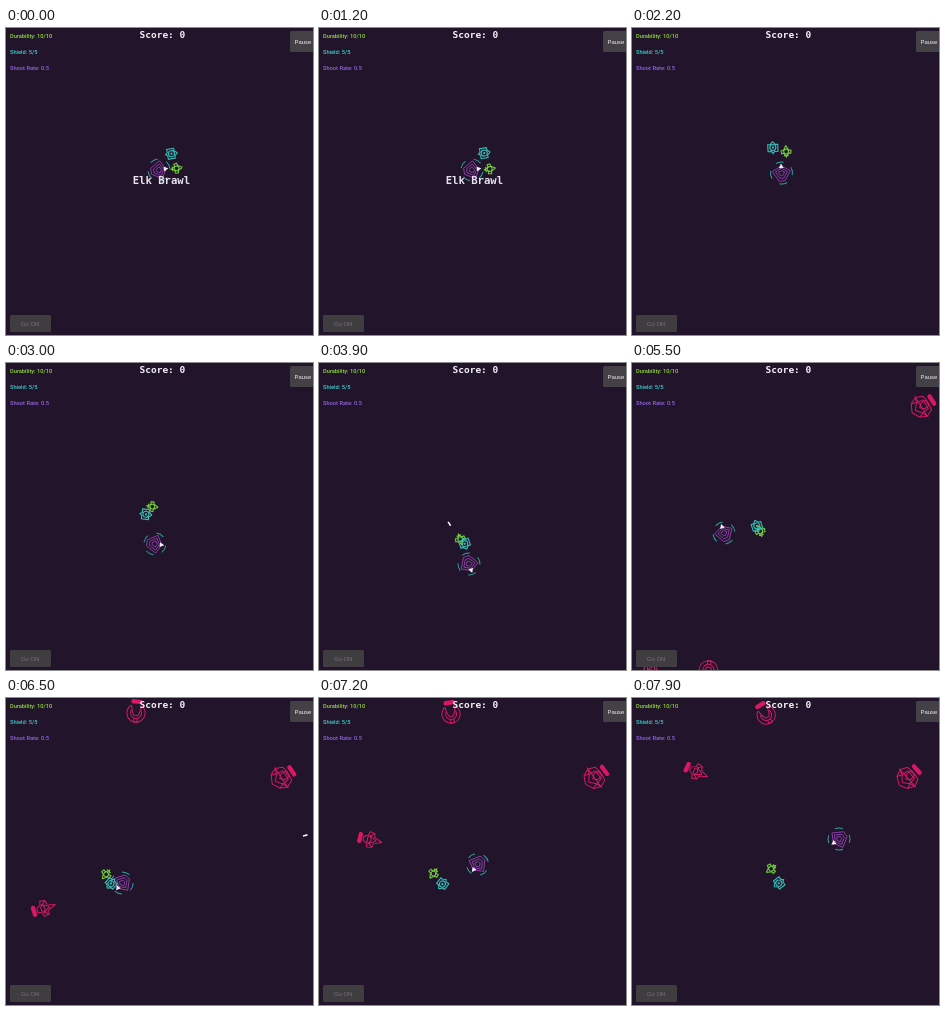
Animation, 307 px wide and 307 px high, one loop 8 s. Source, as an HTML page with a canvas:

```html
<!DOCTYPE html>
<html lang="en">
<head>
<meta charset="utf-8">
<title>Arcade shooter</title>
<style>
html, body { margin: 0; width: 100%; height: 100%; overflow: hidden; background: #21142b; }
canvas { display: block; width: 100vw; height: 100vh; }
</style>
</head>
<body>
<canvas id="stage"></canvas>
<script>
const SIZE = 307, LOOP = 8, TITLE_END = 2;
const BG = '#21142b', RED = '#d81862', CYAN = '#35c0b8', GREEN = '#72cc38',
      PURPLE = '#9343b0', WHITE = '#f4f2f6';
const canvas = document.getElementById('stage');
const ctx = canvas.getContext('2d');

// Steered motion: [seconds, x, y, degrees]
const shipKeys = [
  [1.7, 153, 142, -10], [2.2, 149.5, 145, -93], [3.5, 149, 202, 75], [3.9, 150, 201, 70],
  [4.8, 129, 173, -30], [5.5, 92, 170, -108], [6.5, 116, 185, -230], [7.9, 207, 141, -217]
];
// Midpoint of the two drones and the direction from green to cyan
const pairKeys = [
  [1.5, 168, 133, 251], [2.2, 147.5, 121.5, 197], [3.9, 143.5, 178.5, 45],
  [4.8, 150.5, 178, -79], [5.5, 126.5, 165.5, -121], [6.5, 102.5, 181, -297], [7.9, 143, 178, -298]
];
// Straight flights: at (x, y) at time t, speed per second, active from start to stop
const enemies = [
  { draw: ring, t: 4.8, x: 6, y: 34, vx: 60, vy: -75, start: 4.2, stop: 5.5 },
  { draw: ring, t: 3.9, x: -10, y: 238, vx: 54, vy: 43, start: 3.6, stop: 6 },
  { draw: ring, t: 6.5, x: 130, y: 15, vx: 3, vy: 1.4, start: 6, stop: 8 },
  { draw: heavy, t: 4.8, x: 300, y: 18, vx: -14, vy: 36, start: 4, stop: 6.5 },
  { draw: dart, t: 6.5, x: 39, y: 210, vx: 19, vy: -97, start: 5.2, stop: 8 }
];
const shots = [
  { t: 3.9, x: 130.5, y: 161, vx: -120, vy: -180, start: 3.8, stop: 8 },
  { t: 4.8, x: 96, y: 184.5, vx: -210, vy: 45, start: 4.53, stop: 8 },
  { t: 6.5, x: 299, y: 137.5, vx: 210, vy: -54, start: 5.62, stop: 8 }
];

const rad = deg => deg * Math.PI / 180;

// Cubic Hermite interpolation through unevenly timed keys
function at(keys, t) {
  const last = keys.length - 1;
  if (t <= keys[0][0]) return keys[0].slice(1);
  if (t >= keys[last][0]) return keys[last].slice(1);
  let i = 0;
  while (keys[i + 1][0] < t) i++;
  const a = keys[i], b = keys[i + 1];
  const before = keys[Math.max(0, i - 1)], after = keys[Math.min(last, i + 2)];
  const span = b[0] - a[0], u = (t - a[0]) / span, u2 = u * u, u3 = u2 * u;
  return a.slice(1).map((v, n) => {
    const k = n + 1;
    const m0 = (b[k] - before[k]) / (b[0] - before[0]) * span;
    const m1 = (after[k] - a[k]) / (after[0] - a[0]) * span;
    return (2 * u3 - 3 * u2 + 1) * v + (u3 - 2 * u2 + u) * m0
         + (3 * u2 - 2 * u3) * b[k] + (u3 - u2) * m1;
  });
}

function fly(f, t) {
  const dt = Math.min(t, f.stop) - f.t;
  return [f.x + f.vx * dt, f.y + f.vy * dt];
}

function place(x, y, angle, draw) {
  ctx.save();
  ctx.translate(x, y);
  ctx.rotate(angle);
  draw();
  ctx.restore();
}

function pen(color, width) {
  ctx.strokeStyle = ctx.fillStyle = color;
  ctx.lineWidth = width;
}

function arc(r, from, to) {
  ctx.beginPath();
  ctx.arc(0, 0, r, rad(from), rad(to));
  ctx.stroke();
}

// Outline given by its upper half, mirrored across the x axis
function mirror(half, scale = 1) {
  const n = half.length;
  ctx.beginPath();
  for (let i = 0; i < n; i += 2) ctx.lineTo(half[i] * scale, half[i + 1] * scale);
  for (let i = n - 2; i >= 0; i -= 2) ctx.lineTo(half[i] * scale, -half[i + 1] * scale);
  ctx.stroke();
}

function ship() {
  pen(PURPLE, 0.85);
  for (const s of [1, 0.66, 0.34]) mirror([7, 0, 2, -9, -8, -3, -8, 0], s);
  ctx.fillStyle = WHITE;
  ctx.beginPath();
  ctx.moveTo(9.5, 0);
  ctx.lineTo(5, -2.4);
  ctx.lineTo(5, 2.4);
  ctx.fill();
}

function shield() {
  pen('#2f9f9f', 1);
  for (let a = 0; a < 360; a += 90) arc(11, a - 21, a + 21);
}

function cyanDrone() {
  pen(CYAN, 1.1);
  arc(3, 0, 360);
  mirror([6, 0, 3, -2.5, 3, -5, -4, -5, -4, -1.5, -6, 0]);
  ctx.fillRect(-1, -1, 2, 2);
}

function greenDrone() {
  pen(GREEN, 1.1);
  arc(2.4, 0, 360);
  mirror([6, 0, 1.5, -2.5, 1, -5, -2, -4.5, -1.5, -2, -5.5, 0]);
  mirror([-4, -2.5]);
}

function thruster(length) {
  pen(RED, 4.4);
  ctx.lineCap = 'round';
  mirror([-11.5, -length / 2]);
  ctx.lineCap = 'butt';
  ctx.lineWidth = 1;
}

function ring() {
  thruster(7);
  arc(9.2, -145, 145);
  arc(5.5, -120, 120);
  mirror([-7.5, -5, -2, -4, 2.5, -2, 2.5, 0]);
  mirror([5.5, -1.5, 9, -2]);
}

function heavy() {
  thruster(8.5);
  mirror([12, 0, 8, -8, 1, -11, -6, -8, -7, -2]);
  mirror([8, 0, 3, -6, -4, -5]);
  mirror([3, 0, -1, -3.5, -6, -3]);
  mirror([8, -8, 3, -6, 1, -11]);
}

function dart() {
  thruster(7);
  mirror([11, 0, 3, -3, 2, -7, -3, -8, -4, -4, -8, -2]);
  mirror([5, 0, -2, -4, 0, 0]);
  mirror([2, -7, -4, -2]);
}

function tracer() {
  ctx.fillStyle = WHITE;
  ctx.fillRect(-2.3, -0.8, 4.6, 1.6);
}

function text(str, x, y, font, color) {
  ctx.font = font;
  ctx.fillStyle = color;
  ctx.fillText(str, x, y);
}

function button(label, x, y, w, h, inset, fill, color) {
  ctx.fillStyle = fill;
  ctx.beginPath();
  ctx.roundRect(x, y, w, h, 1.5);
  ctx.fill();
  text(label, x + inset, y + h / 2 + 2.3, '5.9px "Liberation Sans", sans-serif', color);
}

function hud(t) {
  const mono = '"DejaVu Sans Mono", monospace';
  const stats = [['Durability: 10/10', '#92dc3a'], ['Shield: 5/5', '#40cfca'], ['Shoot Rate: 0.5', '#9566e2']];
  stats.forEach(([str, color], i) => text(str, 4, 10 + 16 * i, '500 5.7px Roboto, sans-serif', color));
  text('Score: 0', 133.5, 10, 'bold 9.5px ' + mono, WHITE);
  button('Pause', 284, 3, 25, 21, 4.5, '#444146', '#eeecf0');
  button('Go ON', 4, 287, 41, 17, 11, '#403d40', '#77747a');
  if (t < TITLE_END) text('Elk Brawl', 126.7, 156, 'bold 10.6px ' + mono, '#e6e3ea');
}

function render(t) {
  const w = Math.round(innerWidth * devicePixelRatio), h = Math.round(innerHeight * devicePixelRatio);
  if (canvas.width !== w || canvas.height !== h) {
    canvas.width = w;
    canvas.height = h;
  }
  ctx.setTransform(w / SIZE, 0, 0, h / SIZE, 0, 0);
  ctx.fillStyle = BG;
  ctx.fillRect(0, 0, SIZE, SIZE);

  const [x, y, heading] = at(shipKeys, t);
  for (const e of enemies.filter(e => t >= e.start)) {
    const [ex, ey] = fly(e, t);
    place(ex, ey, Math.atan2(y - ey, x - ex), e.draw);
  }
  for (const s of shots.filter(s => t >= s.start)) {
    place(...fly(s, t), Math.atan2(s.vy, s.vx), tracer);
  }
  place(x, y, rad(heading), ship);
  place(x, y, rad(49 * t - 118), shield);

  const [px, py, side] = at(pairKeys, t);
  const gap = 5.5 + 3 * Math.cos((t - 0.9) * 2 * Math.PI / 7.6);
  const dx = gap * Math.cos(rad(side)), dy = gap * Math.sin(rad(side));
  place(px - dx, py - dy, rad(heading), greenDrone);
  place(px + dx, py + dy, rad(heading), cyanDrone);
  hud(t);
}

const begin = performance.now();
function frame() {
  render((performance.now() - begin) / 1000 % LOOP);
  requestAnimationFrame(frame);
}
frame();
</script>
</body>
</html>
```
